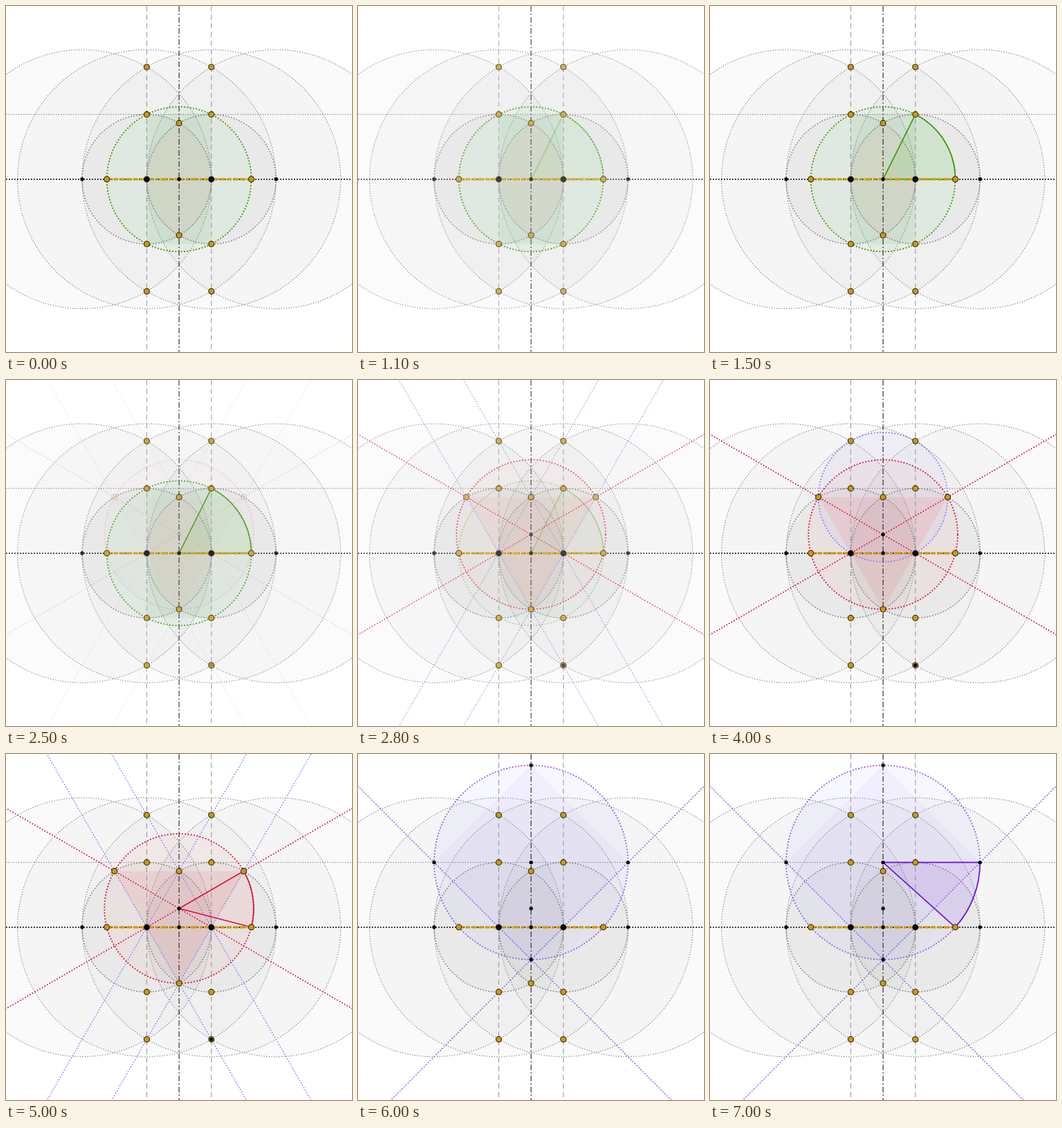
Recreate the animation shown at these times as an HTML page. Size 500 by 499 pixels, loop 8 s.

```html
<!DOCTYPE html>
<html lang="en">
<head>
<meta charset="utf-8">
<title>Compass construction</title>
<style>
html, body { margin: 0; width: 100%; height: 100%; overflow: hidden; background: #fff; }
svg { display: block; width: 100vw; height: 100vh; }
</style>
</head>
<body>
<svg viewBox="0 0 500 499" preserveAspectRatio="none" fill="none">
  <g id="under"></g>
  <g id="over"></g>
</svg>
<script>
// Everything derives from the unit U and the centre (X, Y).
const X = 250.1, Y = 249.8, U = 93.4, H = U / 2;
const L = X - H, R = X + H;
const V = U * Math.sqrt(3) / 2;
const G = U * Math.sqrt(5) / 2;
const top1 = Y - U, lensTop = Y - V, lensLow = Y + V;
const triY = lensTop + 2 * V / 3, triR = 4 * V / 3;
const low = Y + H, quadR = 1.5 * U;
const tall = U * Math.sqrt(3);
const GREEN = '#339900', RED = '#d80f3c', BLUE = '#7f7ff8', PURPLE = '#8a5cf0', GOLD = '#d09a05';
const DOTS = '1.9 2.4';

const n = v => +v.toFixed(2);
const circle = (x, y, r, attr) => `<circle cx="${n(x)}" cy="${n(y)}" r="${n(r)}" ${attr}/>`;
const line = (x1, y1, x2, y2, attr) =>
  `<path d="M${n(x1)} ${n(y1)}L${n(x2)} ${n(y2)}" ${attr}/>`;
const poly = (pts, attr) => `<polygon points="${pts.map(p => p.map(n)).join(' ')}" ${attr}/>`;
const fill = (c, o) => `fill="${c}" fill-opacity="${o}"`;
const stroke = (c, w, dash) =>
  `stroke="${c}" stroke-width="${w}"` + (dash ? ` stroke-dasharray="${dash}"` : '');
const gold = (x, y) => circle(x, y, 4, `fill="${GOLD}" ${stroke('#222', 1.1)}`);
const black = (x, y, r = 2.7) => circle(x, y, r, 'fill="#080808"');

// Two mirrored lines through (X, y) at the given slope.
const cross = (y, slope, attr) => [slope, -slope].map(s =>
  line(X - 500, y - 500 * s, X + 500, y + 500 * s, attr)).join('');

const sector = (cy, px, py, r, tint, o, edge) =>
  `<path d="M${n(X)} ${n(cy)}L${n(px)} ${n(py)}A${n(r)} ${n(r)} 0 0 1 ${n(X + G)} ${n(Y)}Z" ` +
  `${fill(tint, o)} ${stroke(edge, 1.6)} stroke-linejoin="round"/>`;

const bigs = [-1.5, -0.5, 0.5, 1.5].map(k => X + k * U);
const baseFills = bigs.map(x => circle(x, Y, 2 * U, fill('#000', 0.021))).join('') +
  [L, R].map(x => circle(x, Y, U, fill('#000', 0.03))).join('');

const baseLines = bigs.map(x => circle(x, Y, 2 * U, stroke('#8a8a8a', 1.2, '1.4 2.2'))).join('') +
  [L, R].map(x => circle(x, Y, U, stroke('#858585', 1.6, '1.7 2.3'))).join('') +
  line(0, top1, 500, top1, stroke('#8a8a8a', 1.2, '1.4 2.2')) +
  [L, R].map(x => line(x, 0, x, 499, stroke('#999', 1.1, '7.5 5'))).join('') +
  line(X, 0, X, 499, stroke('#222', 1.1, '8 3 2 3')) +
  line(0, Y, 500, Y, stroke('#111', 1.8, '1.8 2.2'));

// The gold bar mirrors about the centre.
const bar = [-1, 1].map(s =>
  line(X + s * G, Y, X + s * H, Y, stroke(GOLD, 3.2, '7 2.5')) +
  line(X + s * H, Y, X, Y, stroke(GOLD, 3.2, '10 3 4 3'))).join('');

const baseDots = bar + black(X - quadR, Y) + black(X + quadR, Y) + black(X, Y) +
  black(L, Y, 4.4) + black(R, Y, 4.4) +
  [L, R].map(x => [-tall, -U, U, tall].map(d => gold(x, Y + d)).join('')).join('') +
  gold(X, lensTop) + gold(X, lensLow) + gold(X - G, Y) + gold(X + G, Y);

const lens = `<path d="M${X} ${n(lensTop)}A${U} ${U} 0 0 1 ${X} ${n(lensLow)}` +
  `A${U} ${U} 0 0 1 ${X} ${n(lensTop)}Z" ${fill('#f0cdaf', 0.18)}/>`;

const scene = (fills, lines, dots = '') => baseFills + fills + baseLines + lines + baseDots + dots;

function green(withSector) {
  return scene(
    circle(X, Y, G, fill('#64d77d', 0.08)) +
    poly([[L, Y - U], [R, Y - U], [R, Y + U], [L, Y + U]], fill('#339933', 0.075)) + lens,
    circle(X, Y, G, stroke(GREEN, 1.8, DOTS)) +
    (withSector ? sector(Y, R, top1, G, '#3cb41e', 0.09, GREEN) : ''));
}

function red(withCircle, withSector) {
  const tri = [[X - U, lensTop], [X + U, lensTop], [X, lensLow]];
  const ray = stroke(BLUE, 1.4, '1.7 2.3');
  return scene(
    (withCircle ? circle(X, lensTop, U, fill('#5a50ff', 0.045)) : '') +
    circle(X, triY, triR, fill('#e63c3c', 0.05)) +
    poly(tri, fill('#e63232', 0.09)),
    (withCircle
      ? circle(X, lensTop, U, stroke(BLUE, 1.7, DOTS))
      : cross(lensTop, Math.sqrt(3), ray) + cross(lensLow, Math.sqrt(3), ray)) +
    cross(triY, 1 / Math.sqrt(3), stroke(RED, 1.6, '1.8 2.3')) +
    circle(X, triY, triR, stroke(RED, 1.8, DOTS)) +
    (withSector ? sector(triY, X + U, lensTop, triR, '#e63232', 0.04, RED) : ''),
    gold(X - U, lensTop) + gold(X + U, lensTop) + black(X, triY) + black(R, Y + tall));
}

function purple(withSector) {
  const tips = [[X, top1 - quadR], [X + quadR, top1], [X, low], [X - quadR, top1]];
  return scene(
    circle(X, top1, quadR, fill('#3c50f0', 0.045)) +
    poly(tips, fill('#7b20ff', 0.04)),
    cross(low, 1, stroke(PURPLE, 1.6, '1.8 2.3')) +
    circle(X, top1, quadR, stroke(PURPLE, 1.8, DOTS)) +
    (withSector ? sector(top1, X + quadR, top1, quadR, '#8228e6', 0.09, '#6a0fe0') : ''),
    tips.map(p => black(...p)).join('') + black(X, top1) + black(X, triY));
}

// Start time, picture, and whether it fades in.
const steps = [
  [0, green(false)],
  [1000, green(true), true],
  [2500, red(false, false), true],
  [4000, red(true, false)],
  [5000, red(false, true)],
  [6000, purple(false)],
  [7000, purple(true)]
];
const under = document.getElementById('under');
const over = document.getElementById('over');
let shown = -1;

function draw(t) {
  let i = steps.length - 1;
  while (steps[i][0] > t) i--;
  const [start, picture, fades] = steps[i];
  if (i !== shown) {
    under.innerHTML = fades ? steps[i - 1][1] : '';
    over.innerHTML = picture;
    shown = i;
  }
  // Both layers are partly clear while fading, so the white shows through.
  const k = fades ? Math.min(1, (Math.floor((t - start) / 100) + 1) / 6) : 1;
  under.setAttribute('opacity', 1 - k);
  over.setAttribute('opacity', k);
}

const begin = performance.now();
function tick() {
  draw((performance.now() - begin) % 8000);
  requestAnimationFrame(tick);
}
tick();
</script>
</body>
</html>
```
